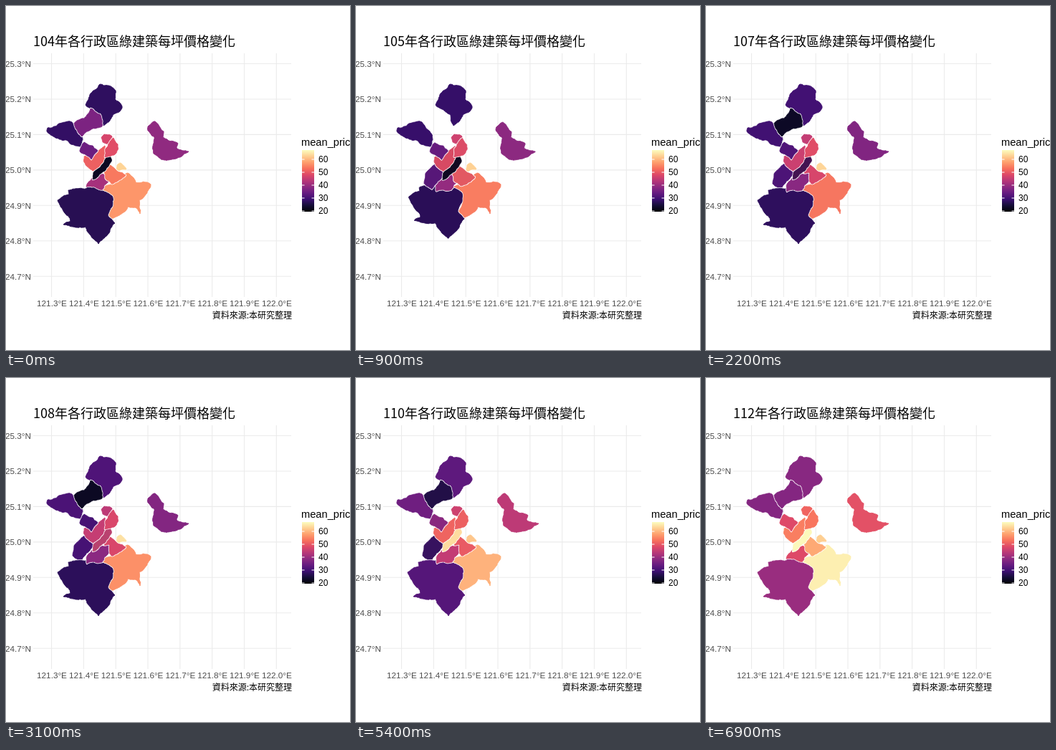
Write an HTML page with a canvas that moves like this. It is 480 px wide and 480 px high and loops after 10 s.

```html
<!DOCTYPE html>
<html lang="zh-Hant">
<head>
<meta charset="utf-8">
<title>各行政區綠建築每坪價格變化</title>
<style>
html, body { margin: 0; width: 100%; height: 100%; overflow: hidden; background: #fff; }
canvas { display: block; width: 480px; height: 480px; }
</style>
</head>
<body>
<canvas id="map" width="480" height="480"></canvas>
<script>
const ctx = document.getElementById('map').getContext('2d');
const SANS = '"Liberation Sans", Arial, sans-serif';
const CJK = '"Noto Sans CJK TC", "Noto Sans CJK", "Noto Sans CJK JP", sans-serif';
const LOOP = 10000, STEP = 100, MOVING = 69, LAST = 8, SAMPLES = 120;

const MAGMA = ['#000004', '#140e36', '#3b0f70', '#641a80', '#8c2981', '#b73779',
  '#de4968', '#f7705c', '#fe9f6d', '#fecf92', '#fcfdbf'];
const STOPS = MAGMA.map(h => [1, 3, 5].map(i => parseInt(h.slice(i, i + 2), 16)));

const mix = (a, b, t) => a.map((v, i) => v + (b[i] - v) * t);

// Value between evenly spaced keys, at x in 0..1.
function along(keys, x) {
  const p = x * (keys.length - 1), i = Math.min(keys.length - 2, Math.floor(p));
  return mix([].concat(keys[i]), [].concat(keys[i + 1]), p - i);
}

let seed = 7;
const random = () => (seed = seed * 16807 % 2147483647) / 2147483647;

// Splits an edge again and again, pushing each midpoint off the line.
function roughen(a, b) {
  const dx = b[0] - a[0], dy = b[1] - a[1];
  if (Math.hypot(dx, dy) < 2.5) return [a];
  const push = (random() - 0.4) * 0.22;
  const mid = [(a[0] + b[0]) / 2 + dy * push, (a[1] + b[1]) / 2 - dx * push];
  return [...roughen(a, mid), ...roughen(mid, b)];
}

// Corners of a district, and its place on the colour scale every second year.
function district(corners, ...price) {
  const pts = corners.split(' ').map(p => p.split(',').map(Number));
  return { price, pts: pts.flatMap((p, i) => roughen(p, pts[(i + 1) % pts.length])) };
}

const DISTRICTS = {
  A: district('131,109 143,111 153,118 152,130 162,140 159,147 149,152 136,167 132,152 111,138 118,122', 17, 20, 26, 27, 39),
  C: district('92,162 104,177 106,196 97,195 84,187 57,175 58,170 71,167', 18, 20, 25, 32, 38),
  E: district('133,184 137,179 148,182 142,192 135,190', 58, 54, 51, 54, 67),
  I: district('160,219 168,228 154,231 155,222', 91, 90, 95, 88, 90),
  L: district('169,233 181,246 202,249 200,255 186,271 187,290 182,282 170,280 146,297 143,290 149,275 148,264 134,258 137,252 152,246', 78, 68, 79, 82, 97),
  B: district('118,143 131,151 134,168 121,171 106,182 95,164 109,157', 36, 7, 6, 10, 38),
  M: district('111,255 134,258 148,265 148,280 142,292 152,303 129,332 111,308 80,305 90,300 87,293 72,271 88,263 87,257', 15, 17, 16, 24, 43),
  J: district('146,222 156,231 167,236 147,248 139,241 137,229', 72, 58, 59, 62, 82),
  O: district('119,218 122,234 104,256 93,248 95,234 107,222', 26, 25, 22, 15, 45),
  K: district('130,234 143,234 143,244 134,257 113,259 114,247', 46, 39, 40, 52, 60),
  H: district('145,209 147,217 138,230 121,242 125,224 135,211', 6, 4, 64, 92, 99),
  G: district('138,195 138,207 121,230 109,218 109,210 123,210', 66, 56, 53, 66, 73),
  D: district('109,190 121,195 128,202 119,214 103,203', 32, 26, 22, 36, 60),
  F: district('150,184 156,193 154,205 138,211 139,199', 61, 62, 58, 65, 71),
  N: district('208,161 220,175 219,183 240,192 238,198 255,203 243,211 221,215 206,206 207,183 198,174 198,168', 41, 37, 38, 50, 62)
};

// Rows are paired by position, so a year without a district shifts the rest.
const ALL = Object.keys(DISTRICTS).join('');
const ABSENT = { 0: 'O', 1: 'B', 8: 'O' };
const rows = year => ALL.replace(ABSENT[year] || '', '');
// The large southern rows are stacked the other way round.
const ORDER = Array.from(ALL, (_, i) => i > 5 && i < 9 ? 14 - i : i);

const colour = (id, year) => along(STOPS, along(DISTRICTS[id].price, year / LAST)[0] / 100);

function resample(pts) {
  const n = pts.length, len = [0];
  for (let i = 0; i < n; i++) {
    const a = pts[i], b = pts[(i + 1) % n];
    len.push(len[i] + Math.hypot(b[0] - a[0], b[1] - a[1]));
  }
  const out = [];
  for (let k = 0, i = 0; k < SAMPLES; k++) {
    const d = len[n] * k / SAMPLES;
    while (len[i + 1] < d) i++;
    out.push(mix(pts[i], pts[(i + 1) % n], (d - len[i]) / (len[i + 1] - len[i])));
  }
  return out;
}

const centre = pts => [0, 1].map(i => pts.reduce((sum, p) => sum + p[i], 0) / pts.length);

// Turns the second outline so that its points lie nearest to the first.
function align(from, to) {
  const a = resample(from), b = resample(to), ca = centre(a), cb = centre(b);
  let best = Infinity, turn = 0;
  for (let s = 0; s < SAMPLES; s++) {
    let sum = 0;
    for (let k = 0; k < SAMPLES; k++) {
      const q = b[(k + s) % SAMPLES];
      sum += (a[k][0] - ca[0] - q[0] + cb[0]) ** 2 + (a[k][1] - ca[1] - q[1] + cb[1]) ** 2;
    }
    if (sum < best) { best = sum; turn = s; }
  }
  return [a, b.slice(turn).concat(b.slice(0, turn))];
}

const pairs = {};
function morph(from, to, t) {
  if (from === to || t === 0) return DISTRICTS[from].pts;
  const [a, b] = pairs[from + to] ||= align(DISTRICTS[from].pts, DISTRICTS[to].pts);
  return a.map((p, i) => mix(p, b[i], t));
}

function outline(style, width) {
  ctx.strokeStyle = style;
  ctx.lineWidth = width;
  ctx.stroke();
}

// The fill reaches a little past its edge, with a thin white rim around it.
function drawShape(pts, rgb) {
  ctx.beginPath();
  pts.forEach(p => ctx.lineTo(p[0], p[1]));
  ctx.closePath();
  outline('#fff', 2.4);
  ctx.fillStyle = `rgb(${rgb.map(Math.round)})`;
  ctx.fill();
  outline(ctx.fillStyle, 0.9);
}

function drawMap(pos) {
  const year = Math.floor(pos), t = pos - year;
  const now = rows(year), next = t ? rows(year + 1) : now;
  for (const i of ORDER) {
    const from = now[i];
    if (!from) continue;
    const to = next[i] || from;
    drawShape(morph(from, to, t), mix(colour(from, year), colour(to, Math.min(LAST, year + 1)), t));
  }
}

function text(str, x, y, font, color = '#000', align = 'left') {
  ctx.font = font;
  ctx.fillStyle = color;
  ctx.textAlign = align;
  ctx.fillText(str, x, y);
}

function line(x1, y1, x2, y2) {
  ctx.beginPath();
  ctx.moveTo(x1, y1);
  ctx.lineTo(x2, y2);
  ctx.stroke();
}

function drawGrid() {
  const font = '11.73px ' + SANS, grey = '#4d4d4d';
  ctx.strokeStyle = '#ebebeb';
  ctx.lineWidth = 1.1;
  for (let i = 0; i < 7; i++) {
    const y = 80.5 + i * 49.45;
    line(38, y, 398, y);
    text((25.3 - i / 10).toFixed(1) + '°N', 35, y + 4.3, font, grey, 'right');
  }
  for (let i = 0; i < 8; i++) {
    const x = 63.5 + i * 44.83;
    line(x, 66, x, 406);
    text((121.3 + i / 10).toFixed(1) + '°E', x + 0.5, 419, font, grey, 'center');
  }
}

function drawLegend() {
  text('mean_price', 412, 195, '14.67px ' + SANS);
  const bar = ctx.createLinearGradient(0, 287, 0, 201);
  MAGMA.forEach((c, i) => bar.addColorStop(i / 10, c));
  ctx.fillStyle = bar;
  ctx.fillRect(413, 201, 17, 86);
  ctx.strokeStyle = '#fff';
  ctx.lineWidth = 1;
  for (let i = 0; i < 5; i++) {
    const y = 214 + i * 18;
    line(413, y, 416.5, y);
    line(426.5, y, 430, y);
    text(60 - i * 10, 436, y + 4, '12px ' + SANS);
  }
}

function draw(ms) {
  const frame = Math.min(MOVING, Math.floor((ms % LOOP) / STEP));
  const pos = frame * LAST / MOVING;
  ctx.fillStyle = '#fff';
  ctx.fillRect(0, 0, 480, 480);
  ctx.lineJoin = 'round';
  drawGrid();
  drawMap(pos);
  drawLegend();
  text(104 + Math.round(pos) + '年各行政區綠建築每坪價格變化', 38, 56, '500 18px ' + CJK);
  text('資料來源:本研究整理', 399, 436, '500 12px ' + CJK, '#000', 'right');
}

const start = performance.now();
function tick() {
  draw(performance.now() - start);
  requestAnimationFrame(tick);
}
tick();
</script>
</body>
</html>
```
